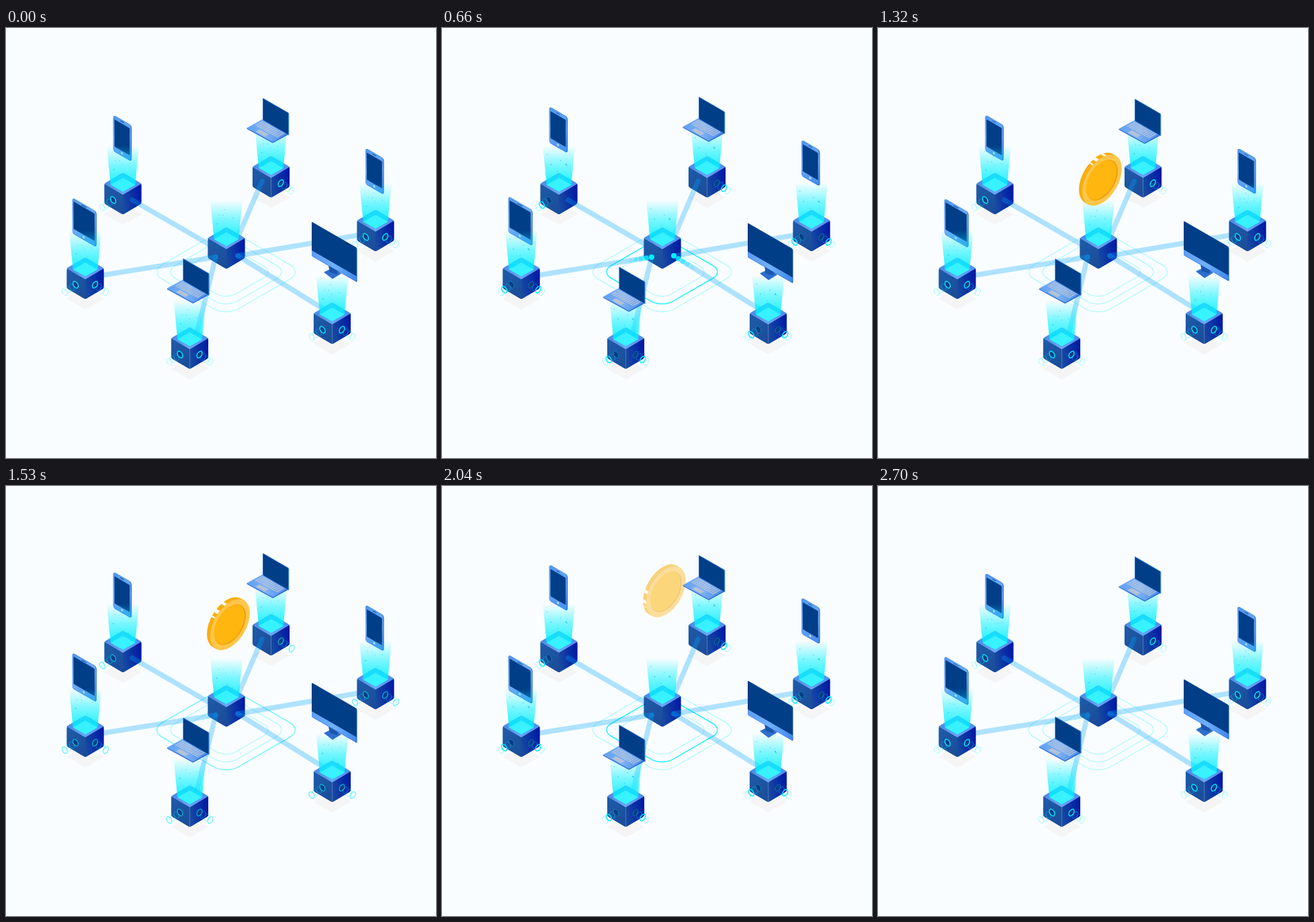
Recreate the animation shown at these times as an HTML page with a canvas. Size 640 px wide and 640 px high, loop 2730 ms.

```html
<!DOCTYPE html>
<html lang="en">
<head>
<meta charset="utf-8">
<title>Device network</title>
<style>
  html, body { margin: 0; height: 100%; overflow: hidden; background: #f9fdff; }
  canvas { display: block; }
</style>
</head>
<body>
<canvas id="stage" width="640" height="640"></canvas>
<script>
const stage = document.getElementById('stage').getContext('2d');
const layer = new OffscreenCanvas(640, 640).getContext('2d');
let ctx = stage;
const LOOP = 2730, CYCLE = LOOP / 2, TAU = Math.PI * 2;
const SCREEN = '#003e88', CYAN = '#00f0ff';
const clamp = v => Math.max(0, Math.min(1, v));
const random = n => { const v = Math.sin(n * 127.1 + 3.7) * 43758.5453; return v - Math.floor(v); };

function at(x, y, draw) {
  ctx.save();
  ctx.translate(x, y);
  draw();
  ctx.restore();
}

// Upright isometric plane: slope 1 falls to the right, -1 rises.
function plane(x, y, slope, draw) {
  at(x, y, () => { ctx.transform(.866, .5 * slope, 0, 1, 0, 0); draw(); });
}

// Draws on a separate layer, then fades it as one piece.
function group(alpha, draw) {
  layer.clearRect(0, 0, 640, 640);
  ctx = layer;
  draw();
  ctx = stage;
  ctx.globalAlpha = alpha;
  ctx.drawImage(layer.canvas, 0, 0);
  ctx.globalAlpha = 1;
}

function poly(fill, ...pts) {
  ctx.beginPath();
  for (let i = 0; i < pts.length; i += 2) ctx.lineTo(pts[i], pts[i + 1]);
  ctx.closePath();
  ctx.fillStyle = fill;
  ctx.fill();
}

function box(fill, x, y, w, h, r = 0) {
  ctx.beginPath();
  ctx.roundRect(x, y, w, h, r);
  ctx.fillStyle = fill;
  ctx.fill();
}

function disc(fill, x, y, r) {
  ctx.beginPath();
  ctx.arc(x, y, r, 0, TAU);
  ctx.fillStyle = fill;
  ctx.fill();
}

function gradient(x0, y0, x1, y1, ...colors) {
  const g = ctx.createLinearGradient(x0, y0, x1, y1);
  colors.forEach((c, i) => g.addColorStop(i / (colors.length - 1), c));
  return g;
}

function cable(x0, y0, x1, y1) {
  ctx.beginPath();
  ctx.moveTo(x0, y0);
  ctx.lineTo(x1, y1);
  ctx.lineWidth = 7.5;
  ctx.lineCap = 'round';
  ctx.strokeStyle = 'rgba(0,162,255,.3)';
  ctx.stroke();
}

// Brightness of relay stage k; the pulse runs from stage 3 inward to 0.
function pulse(k, t) {
  let d = Math.abs(t % CYCLE - CYCLE * (1 - k / 4));
  d = Math.min(d, CYCLE - d);
  return clamp(2 - d / 114);
}

function floorRings(t) {
  [62.5, 82.5, 103].forEach((extent, i) => {
    const r = 20 + i * 3, s = (extent + r * .414) / Math.SQRT2;
    ctx.save();
    ctx.translate(327.5, 363);
    ctx.scale(1, .577);
    ctx.rotate(Math.PI / 4);
    ctx.beginPath();
    ctx.roundRect(-s, -s, 2 * s, 2 * s, r);
    ctx.restore();
    ctx.lineWidth = 1.2;
    ctx.strokeStyle = `rgba(0,240,255,${.3 + .7 * pulse(i + 1, t)})`;
    ctx.stroke();
  });
}

function cube(x, y, shadow = true) {
  at(x, y, () => {
    if (shadow) poly('#f5f5f6', 0, 45, 28, 61, 0, 77, -28, 61);
    const w = 27.8;
    const edge = [[w, 15.5], [w, 45.5], [0, 62], [-w, 45.5], [-w, 15.5], [0, -1]];
    ctx.beginPath();
    ctx.moveTo(w / 2, 7.25);
    edge.forEach(([px, py], i) => ctx.arcTo(px, py, ...edge[(i + 1) % 6], 5));
    ctx.closePath();
    ctx.clip();
    poly(gradient(-w, 0, w, 0, '#4a86e4', '#66a8fa', '#4a8cf0'), 0, -1, w, 15.5, 0, 32, -w, 15.5);
    poly(gradient(-w, 20, 0, 58, '#1e5ba9', '#1b4c98'), -w, 15.5, 0, 32, 0, 62, -w, 45.5);
    poly(gradient(0, 40, w, 36, '#174aa2', '#0019a6'), 0, 32, w, 15.5, w, 45.5, 0, 62);
  });
}

function beam(x, y, t) {
  at(x, y, () => {
    poly(gradient(0, -41, 0, 20, 'rgba(0,240,255,0)', 'rgba(0,240,255,.53)', 'rgba(0,240,255,.93)'),
      -24, -41, 24, -41, 18.3, 17.5, 0, 27.5, -18.3, 17.5);
    poly('rgba(70,246,255,.75)', 0, 7, 18.3, 17.5, 0, 27.5, -18.3, 17.5);
    for (let i = 0; i < 13; i++) {
      const p = (t / CYCLE + random(i)) % 1;
      ctx.globalAlpha = .65 * Math.sin(Math.PI * p);
      disc('#00b6e6', (random(i + 40) - .5) * (22 + 16 * p), 10 - 46 * p, .5 + .4 * random(i + 80));
    }
  });
}

// Chain of rings leaving one side of a cube: -1 left, 1 right.
function relay(x, y, side, t) {
  for (let k = 0; k < 4; k++) {
    plane(x + side * (14.5 + 5.4 * k), y + 40 + 3.7 * k, -side, () => {
      if (k === 0) disc('#063c84', 0, 0, 4.4);
      ctx.beginPath();
      ctx.arc(0, 0, 4.5, 0, TAU);
    });
    const b = pulse(k, t);
    ctx.lineWidth = 1 + .4 * b;
    ctx.strokeStyle = `rgba(0,236,255,${.32 + .68 * b})`;
    ctx.stroke();
  }
}

function handheld(x, y, w, h, inset) {
  plane(x, y, 1, () => {
    box('#1f62c8', 0, 0, w, h, 4);
    box(gradient(0, 0, w, h, '#4e94ee', '#78b4fb', '#3d86ea'), 0, 0, w - 1.3, h - .5, 4);
    box(SCREEN, 2, inset, w - 5.2, h - inset - 7.8, 1);
    box(SCREEN, w * .38, 2.4, w * .2, .9, .4);
    disc('#c4e2ff', w * .47, h - 4.2, 1.7);
  });
}

const phone = (x, y) => handheld(x, y, 31.5, 54, 5.8);
const tablet = (x, y) => handheld(x, y, 41.5, 53.3, 4.8);

function laptop(x, y) {
  at(x, y, () => {
    poly('#2b6cd2', -23.5, 45, 15, 65, 39, 52, 39, 54.5, 15, 67.5, -23.5, 46.5);
    poly(gradient(-23, 40, 39, 55, '#609ff2', '#7db2f6', '#4084e7'), 0, 32, 39, 52.5, 15, 66, -23.5, 45);
    ctx.save();
    ctx.transform(39, 21, -23.5, 13, 0, 32);
    for (let row = 0; row < 5; row++)
      for (let key = 0; key < 11; key++)
        box('#bcc8da', .06 + key * .08, .13 + row * .1, .06, .068);
    box('#b4c2d6', .3, .69, .34, .25);
    ctx.restore();
    plane(0, 0, 1, () => {
      box('#3c82e4', 0, 0, 45.4, 33.5, 1.5);
      box(SCREEN, .9, 1, 43, 31.7, .8);
    });
  });
}

function monitor(x, y) {
  at(x, y, () => {
    poly('#2d6fce', 18, 75, 32, 68, 44, 77, 31, 85);
    poly('#1c55ad', 25, 65, 39, 71, 38, 78, 27, 75);
    plane(0, 0, 1, () => {
      box('#1d60cb', 0, 0, 78, 51, 2);
      box(gradient(0, 0, 77, 0, '#5c9df4', '#6fb0fc', '#3f86ea'), 0, 0, 77, 50.6, 2);
      box(SCREEN, 0, 0, 77.2, 42.5, [2, 2, 0, 0]);
    });
  });
}

function coin(t) {
  const x = 333.5, y = 252.5 - .096 * (t - 1050), r = 34;
  const spin = -.105 * (t - 1320);
  const face = (fill, dx, dy, radius) => plane(x + dx, y + dy, -1, () => disc(fill, 0, 0, radius));
  const rim = degrees => {
    const a = (degrees + spin) * Math.PI / 180;
    return [x + .866 * r * Math.cos(a), y - .5 * r * Math.cos(a) + r * Math.sin(a)];
  };
  for (let depth = 5; depth > 0; depth--) face('#f9ad10', -depth, -depth * .58, r);
  // Glints on the rim: start angle and width.
  for (const [angle, width] of [[-84, 7], [-107, 8], [-118, 3]]) {
    const [ax, ay] = rim(angle), [bx, by] = rim(angle + width);
    poly('#fffdf4', ax, ay, bx, by, bx - 5, by - 2.9, ax - 5, ay - 2.9);
  }
  face('#ffc64b', 0, 0, r);
  face('#e99a08', 0, 0, 27);
  face('#ffb60f', -1, -.4, 26.3);
}

// Packet of dots running along a cable into the hub.
function packet(x0, y0, x1, y1, t) {
  const length = Math.hypot(x1 - x0, y1 - y0);
  const head = (t - 220) / 420;
  if (head < 0 || t > 780) return;
  const fade = clamp((780 - t) / 100);
  for (let i = 4; i >= 0; i--) {
    const p = Math.min(1, head) - i * 8 / length;
    if (p < 0) continue;
    ctx.globalAlpha = fade * (1 - i * .2);
    disc(CYAN, x0 + (x1 - x0) * p, y0 + (y1 - y0) * p, 4 - i * .25);
  }
  ctx.globalAlpha = 1;
}

function node(x, y, sides, t) {
  cube(x, y);
  sides.forEach(side => relay(x, y, side, t));
}

function render(t) {
  const angle = TAU * t / CYCLE;
  const bob = 6.2 * Math.cos(angle), sway = 6.1 * Math.sin(angle - .1);
  ctx.fillStyle = '#f9fdff';
  ctx.fillRect(0, 0, 640, 640);

  floorRings(t);
  node(174, 216, [-1], t);
  node(394.5, 191, [1], t);
  cable(188, 256, 328, 337);
  cable(381, 228, 335, 335);
  cube(328, 297, false);
  cable(312, 341, 118, 372);
  cable(312, 341, 284, 455);
  cable(345, 339, 550, 304);
  cable(345, 339, 485, 426);
  packet(145, 368, 312, 341, t);
  packet(470, 416.5, 345, 339, t);
  beam(328, 297, t);
  const coinAlpha = clamp((t - 950) / 200) * clamp((2150 - t) / 200);
  if (coinAlpha) group(coinAlpha, () => coin(t));

  phone(159.7, 123 + bob);
  beam(174, 216, t);

  beam(394.5, 191, t);
  laptop(382, 103.2 - sway);

  node(550, 271, [-1, 1], t);
  phone(535.2, 172.3 + bob);
  beam(550, 271, t);

  node(118, 342, [-1, 1], t);
  tablet(98.8, 251.8 - sway);
  beam(118, 342, t);

  node(273.5, 446, [-1, 1], t);
  beam(273.5, 446, t);
  laptop(263.3, 348.8 - bob);

  node(485.5, 409, [-1, 1], t);
  beam(485.5, 409, t);
  monitor(455, 289 + sway);
}

function tick() {
  render(performance.now() % LOOP);
  requestAnimationFrame(tick);
}
tick();
</script>
</body>
</html>
```
